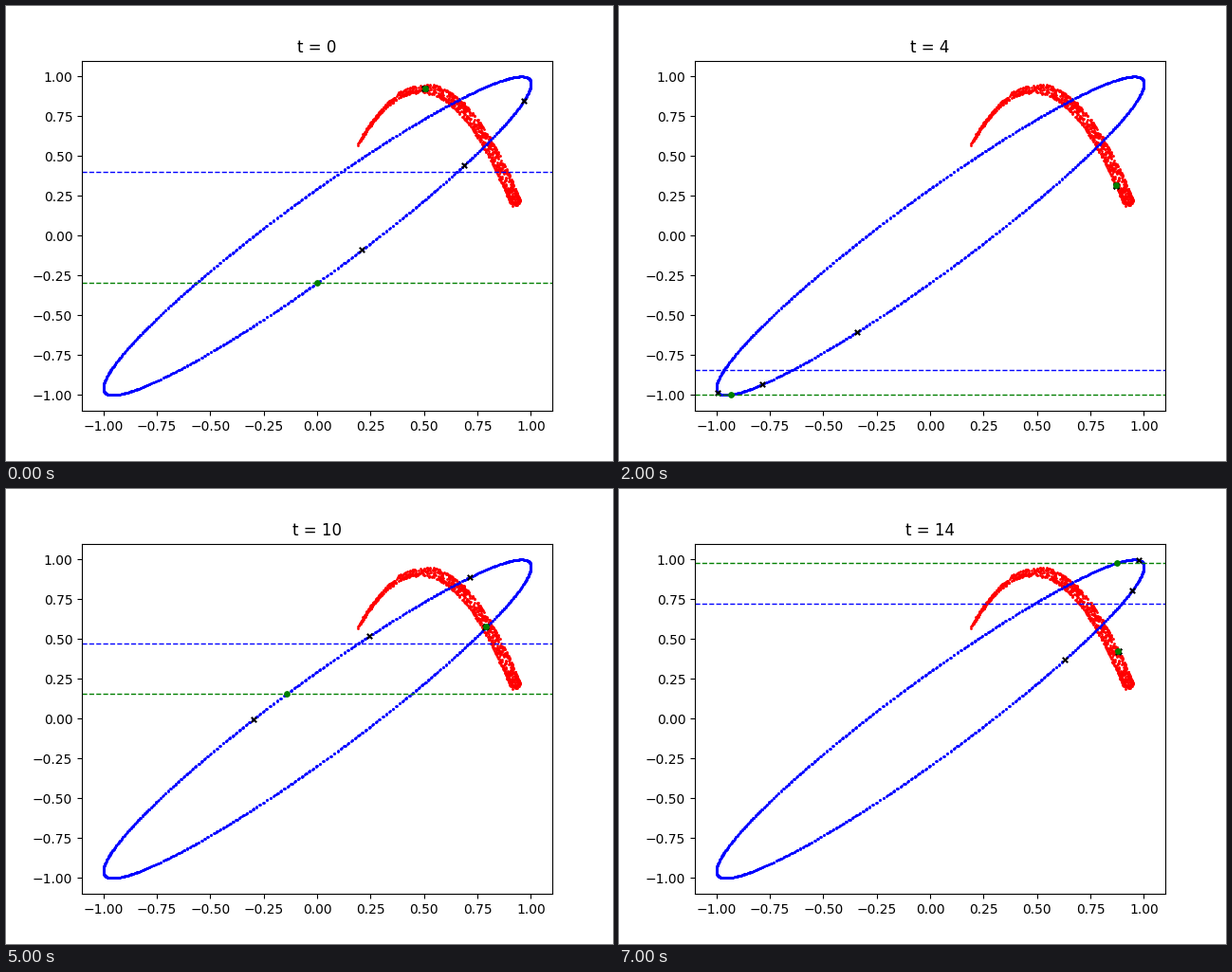
A matplotlib script that plays this animation: 640x480 px, repeating every 8 s.

```python
import numpy as np
import matplotlib.pyplot as plt
from matplotlib.animation import FuncAnimation

N = 1000
STEP = 0.3     # phase advance of the driver per time step
SPREAD = 0.55  # phase distance between neighbours
TIMES = range(0, 16, 2)
STATES = (0.505, 0.173, 0.87, 0.775, 0.885, 0.79, 0.88, 0.88)


def embed(phase):
    """Delay embedding of the sine driver."""
    phase = np.asarray(phase)
    return np.column_stack([-np.sin(phase), -np.sin(phase + STEP)])


def advance(z, t):
    """One step of the logistic-type map forced by the driver."""
    return z * (3.75 - (3.8 + 0.1 * np.sin(STEP * t)) * z)


def neighbours(t):
    """Three neighbours around a phase that runs ahead of the driver."""
    return embed(0.415 * t - 0.76 + SPREAD * np.array([-1, 0, 1]))


rng = np.random.default_rng(4)
series = [STATES[0]]
for t in range(N):
    series.append(advance(series[-1], t) + rng.normal(0, 0.003))
jitter = rng.normal(0, 0.003, (len(TIMES), 3, 2))

fig, ax = plt.subplots(figsize=(6.4, 4.8), dpi=100)
ticks = np.linspace(-1, 1, 9)
ax.set(xlim=(-1.1, 1.1), ylim=(-1.1, 1.1), xticks=ticks, yticks=ticks)

ax.scatter(series[:-1], series[1:], s=1, color="red")
ax.scatter(*embed(STEP * np.arange(N)).T, s=1, color="blue")
crosses = ax.scatter([], [], s=15, color="black", marker="x")
dots = ax.scatter([], [], s=15, color="green")
actual = ax.axhline(0, color="green", ls="--", lw=1)
estimate = ax.axhline(0, color="blue", ls="--", lw=1)
title = ax.set_title("")


def update(i):
    t, z = TIMES[i], STATES[i]
    state = np.array([z, advance(z, t)])
    here = embed([STEP * t])
    near = neighbours(t)
    crosses.set_offsets(np.vstack([near, state + jitter[i]]))
    dots.set_offsets(np.vstack([here, state]))
    actual.set_ydata([here[0, 1]] * 2)
    estimate.set_ydata([near[:, 1].mean()] * 2)
    title.set_text(f"t = {t}")
    return crosses, dots, actual, estimate, title


anim = FuncAnimation(fig, update, frames=len(TIMES), interval=1000,
                     repeat=True, repeat_delay=0)
plt.show()
```
